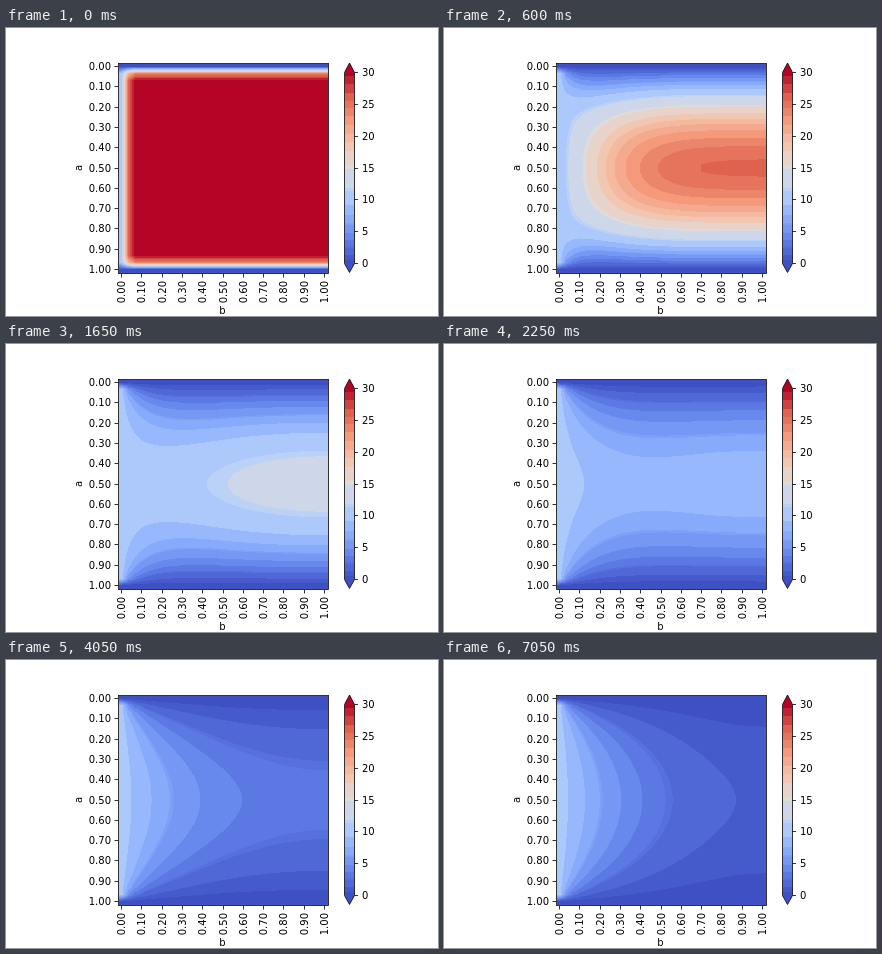
Write an HTML page with a canvas that moves like this. It is 432 by 288 pixels and loops after 7.2 s.

```html
<!DOCTYPE html>
<html lang="en">
<head>
<meta charset="utf-8">
<title>Heat diffusion</title>
<style>
html, body { margin: 0; width: 100%; height: 100%; overflow: hidden; background: #fff; }
canvas { display: block; }
</style>
</head>
<body>
<canvas id="stage" width="432" height="288"></canvas>
<script>
const ctx = document.getElementById('stage').getContext('2d');
const N = 30, FRAMES = 48, FRAME_MS = 150, STEPS = 40, RATE = 0.2;
const LEFT = 112, TOP = 35, SIZE = 210, CELL = SIZE / N, INNER = SIZE - 1;

// Diverging blue-white-red scale and the limits of its colour bands
const stops = [
  [59, 76, 192], [98, 130, 234], [141, 176, 254], [184, 208, 249], [221, 221, 221],
  [245, 196, 173], [244, 154, 123], [222, 96, 77], [180, 4, 38]
];
const limits = [0, 0.54, 1.37, 2.46, 2.68, 3.63, 4.81, 6.12, 6.35, 7.6, 9.18, 11.4, 11.9,
  14.9, 15.5, 17.6, 19.1, 20.4, 21.8, 23.2, 24.4, 25.5, 26.8, 28.2, 29.4];

function scaleColor(value) {
  const p = value / 30 * 8, i = Math.min(7, Math.floor(p));
  return stops[i].map((c, k) => Math.round(c + (stops[i + 1][k] - c) * (p - i)));
}

const bands = limits.map((low, i) =>
  i === limits.length - 1 ? stops[8] : scaleColor((low + limits[i + 1]) / 2));

function bandColor(value) {
  let i = limits.length - 1;
  while (i > 0 && value < limits[i]) i--;
  return bands[i];
}

// Plate at 30, left edge held at 10, top and bottom at 0, right edge insulated
function startGrid() {
  return Float64Array.from({ length: N * N }, (_, i) => {
    const row = Math.floor(i / N);
    if (row === 0 || row === N - 1) return 0;
    return i % N === 0 ? 10 : 30;
  });
}

function diffuse(u) {
  const next = u.slice();
  for (let row = 1; row < N - 1; row++) {
    for (let col = 1; col < N; col++) {
      const i = row * N + col;
      const right = col === N - 1 ? u[i - 1] : u[i + 1];
      next[i] += RATE * (u[i - N] + u[i + N] + u[i - 1] + right - 4 * u[i]);
    }
  }
  return next;
}

function simulate() {
  const grids = [];
  let u = diffuse(startGrid());
  for (let f = 0; f < FRAMES; f++) {
    grids.push(u);
    for (let s = 0; s < STEPS; s++) u = diffuse(u);
  }
  return grids;
}

// Cell index and fraction for each pixel along one side
const samples = Array.from({ length: INNER }, (_, p) => {
  const pos = Math.max(0, Math.min(N - 1, (p + 1.5) / CELL - 0.5));
  const cell = Math.min(N - 2, Math.floor(pos));
  return [cell, pos - cell];
});

const image = ctx.createImageData(INNER, INNER);

function drawMap(u) {
  let p = 0;
  for (const [row, fy] of samples) {
    for (const [col, fx] of samples) {
      const i = row * N + col;
      const a = u[i] + (u[i + 1] - u[i]) * fx;
      const b = u[i + N] + (u[i + N + 1] - u[i + N]) * fx;
      const [red, green, blue] = bandColor(a + (b - a) * fy);
      image.data[p++] = red;
      image.data[p++] = green;
      image.data[p++] = blue;
      image.data[p++] = 255;
    }
  }
  ctx.putImageData(image, LEFT + 1, TOP + 1);
}

function line(x1, y1, x2, y2) {
  ctx.beginPath();
  ctx.moveTo(x1, y1);
  ctx.lineTo(x2, y2);
  ctx.stroke();
}

function label(text, x, y, align, turned) {
  ctx.save();
  ctx.translate(x, y);
  if (turned) ctx.rotate(-Math.PI / 2);
  ctx.textAlign = align;
  ctx.fillText(text, 0, 0);
  ctx.restore();
}

function drawAxes() {
  ctx.strokeRect(LEFT + 0.5, TOP + 0.5, SIZE, SIZE);
  for (let i = 0; i <= 10; i++) {
    const offset = i * 2.9 * CELL, text = (i / 10).toFixed(2);
    const x = Math.floor(115.5 + offset) + 0.5, y = Math.floor(38.5 + offset) + 0.5;
    line(LEFT - 3.5, y, LEFT, y);
    line(x, TOP + SIZE + 1, x, TOP + SIZE + 4.5);
    label(text, 105, y + 3.5, 'right');
    label(text, x + 3.5, 253, 'right', true);
  }
  label('a', 76, 140, 'center', true);
  label('b', 216.5, 286, 'center');
}

function drawBar() {
  const x = 338.5, w = 10, low = 235.5, high = 44.5;
  const barY = value => low + (high - low) * value / 30;
  const outline = () => {
    ctx.beginPath();
    ctx.moveTo(x, low);
    ctx.lineTo(x + w / 2, 244.5);
    ctx.lineTo(x + w, low);
    ctx.lineTo(x + w, high);
    ctx.lineTo(x + w / 2, 35);
    ctx.lineTo(x, high);
    ctx.closePath();
  };
  ctx.save();
  outline();
  ctx.clip();
  for (let y = 35; y < 246; y++) {
    const value = (low - y - 0.5) / (low - high) * 30;
    ctx.fillStyle = `rgb(${bandColor(value)})`;
    ctx.fillRect(x, y, w, 1);
  }
  ctx.restore();
  outline();
  ctx.stroke();
  for (let value = 0; value <= 30; value += 5) {
    const y = Math.floor(barY(value)) + 0.5;
    line(x + w, y, x + w + 3.5, y);
    label(value, 356, y + 3.5, 'left');
  }
}

ctx.fillStyle = '#fff';
ctx.fillRect(0, 0, 432, 288);
ctx.fillStyle = ctx.strokeStyle = '#000';
ctx.lineWidth = 0.8;
ctx.font = '10px "DejaVu Sans", sans-serif';
drawAxes();
drawBar();

const grids = simulate();
let shown = -1;

function tick() {
  const frame = Math.floor(performance.now() / FRAME_MS) % FRAMES;
  if (frame !== shown) drawMap(grids[shown = frame]);
  requestAnimationFrame(tick);
}
tick();
</script>
</body>
</html>
```
